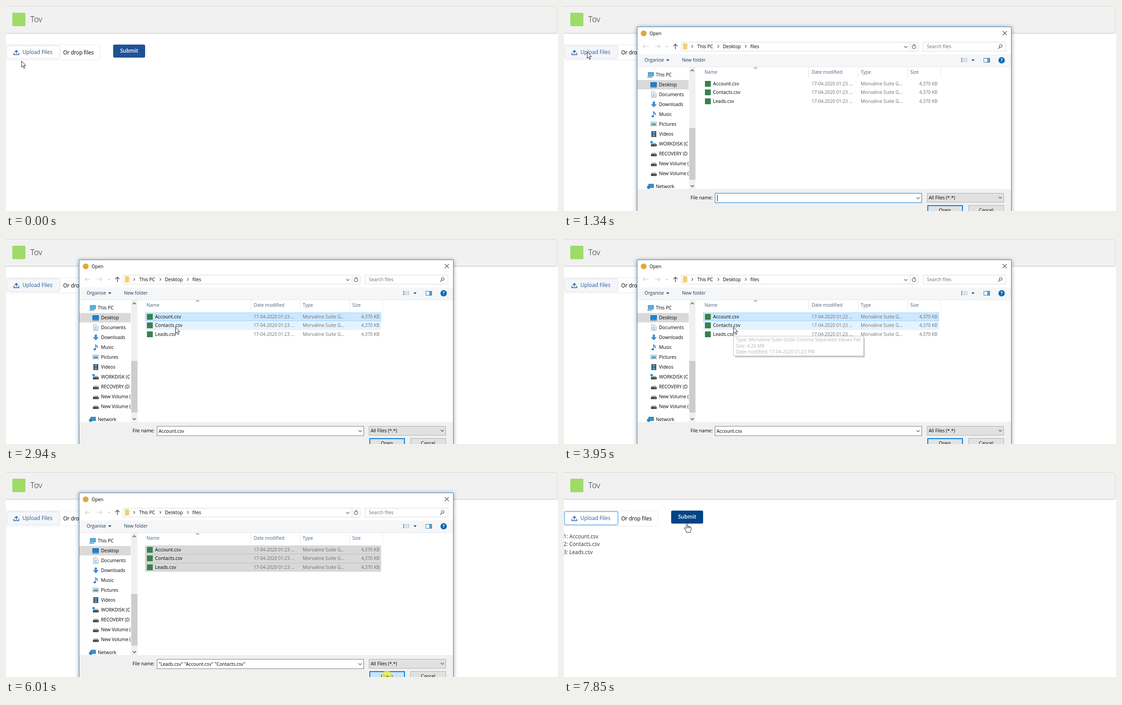
Recreate the animation shown at these times as an HTML page. Size 1226 by 457 pixels, loop 8000 ms.

```html
<!DOCTYPE html>
<html lang="en">
<head>
<meta charset="utf-8">
<title>Upload files</title>
<style>
html, body { margin: 0; width: 100%; height: 100%; overflow: hidden; background: #fff; }
svg { display: block; overflow: hidden; }
text { font-family: "Open Sans", sans-serif; font-size: 10.3px; fill: #000; white-space: pre; }
.page text { font-size: 11.7px; }
.page .title { font-size: 18px; font-weight: 300; fill: #222; }
.page .submit { font-weight: 600; fill: #fff; text-anchor: middle; }
.window { filter: drop-shadow(0 1px 5px rgba(0, 0, 0, .4)); }
.head text { fill: #4c607a; }
.cmd { fill: #1e395b; }
.meta { fill: #6d6d6d; }
.num { font-size: 10px; }
.file { font-size: 10.5px; }
.mid { text-anchor: middle; }
.line { fill: none; stroke: #555; stroke-width: 1.2; }
#tip text { fill: #6a6a6a; }
</style>
</head>
<body>
<svg width="1226" height="457" viewBox="0 0 1226 457">
  <defs>
    <clipPath id="navClip"><rect x="163" y="136" width="114" height="272"/></clipPath>
    <g id="drive">
      <path d="M2 3H11L13 7H0Z" fill="#b5b5b5"/>
      <rect y="6" width="13" height="5" rx="1" fill="#4b4b4b"/>
      <rect x="9" y="8" width="2" height="1" fill="#7fdc8c"/>
    </g>
  </defs>

  <g class="page">
    <rect x="-6" y="2" width="1231" height="60" rx="4" fill="#e4e4e4"/>
    <rect x="-6" y=".5" width="1230.5" height="60" rx="4" fill="#f1f1f1" stroke="#d2d2d2"/>
    <rect x="14" y="15" width="29" height="30" rx="2" fill="#9edc67"/>
    <text class="title" x="54" y="36">Tov</text>
    <rect x="-6.500" y="86.500" width="215" height="34" rx="4" fill="none" stroke="#d9d9d9" stroke-dasharray="3 2"/>
    <rect id="glow" x=".5" y="87.500" width="120" height="31" rx="4" fill="none" stroke="#1589ee" stroke-opacity=".3" stroke-width="2"/>
    <rect id="upload" x="1.500" y="88.500" width="118" height="29" rx="3.500"/>
    <path d="M23 106V99M19.500 102.500L23 99L26.500 102.500M17.500 104.500V108.500H28.500V104.500" fill="none" stroke="#1c5297" stroke-width="1.500"/>
    <text id="uploadText" x="36.500" y="107">Upload Files</text>
    <text x="127" y="108" fill="#222">Or drop files</text>
    <rect id="submit" x="238" y="86" width="71" height="29" rx="3"/>
    <text class="submit" x="273.500" y="104">Submit</text>
    <g id="list" style="opacity:.82">
      <text x="-1" y="148">1: Account.csv</text>
      <text x="-1" y="165">2: Contacts.csv</text>
      <text x="-1" y="183">3: Leads.csv</text>
    </g>
  </g>

  <g id="dialog">
    <rect class="window" x="162.500" y="46.500" width="831" height="460" fill="#fff" stroke="#2f86d0"/>
    <circle cx="177" cy="61" r="6.500" fill="#e0a83c"/>
    <text x="190" y="65">Open</text>
    <path class="line" d="M974.500 56L983.500 65M983.500 56L974.500 65" stroke="#222"/>

    <path d="M187 90H176M180 86L176 90L180 94M202 90H213M209 86L213 90L209 94M226 89L228.500 91.500L231 89" class="line" style="stroke:#c9c9c9"/>
    <path class="line" d="M247.500 96V85M243 89.500L247.500 85L252 89.500" style="stroke-width:1.6"/>
    <path d="M260.500 80.500H786.500V100.500H260.500ZM768.500 80.500V100.500M797.500 80.500H981.500V100.500H797.500Z" fill="#fff" stroke="#d9d9d9"/>
    <path d="M264 83H273V85H275V97H264Z" fill="#f5cf6d"/>
    <path d="M273 85H275V97H272Z" fill="#ffe6a2"/>
    <path class="line" d="M283.500 87L286 90L283.500 93M341.500 87L344 90L341.500 93M402.500 87L405 90L402.500 93M755.500 89.500L759 93L762.500 89.500"/>
    <path class="line" d="M780 88A4 4 0 1 1 776.500 87M776 84.500L779.500 87L776.500 89.500"/>
    <text x="296" y="94">This PC</text><text x="353" y="94">Desktop</text><text x="414" y="94">files</text>
    <text class="meta" x="806" y="94">Search files</text>
    <circle class="line" cx="970" cy="89" r="3"/><path class="line" d="M968 91.500L964 95.500"/>

    <path d="M163 108H993V135H163Z" fill="#f5f6f7"/>
    <path d="M163 135.500H993" stroke="#e6e8ea"/>
    <text class="cmd" x="179" y="124">Organise</text><text class="cmd" x="262" y="124">New folder</text>
    <path d="M227 119H234L230.500 123ZM905 119H912L908.500 123Z" fill="#334a68"/>
    <path d="M882 117H885M882 120.500H885M882 124H885" stroke="#667b91" stroke-width="2"/>
    <path d="M887 117H891M892 117H896M887 120.500H891M892 120.500H896M887 124H891M892 124H896" stroke="#8c9aa8"/>
    <rect x="932.500" y="116.500" width="13" height="9" fill="#fff" stroke="#397299"/>
    <path d="M940 117H945V125H940Z" fill="#4ba5e1"/>
    <circle cx="972" cy="121" r="7" fill="#0864b4"/>
    <text class="mid" x="972" y="125" style="fill:#fff;font-weight:700">?</text>

    <rect x="163" y="165" width="114" height="21" fill="#d9d9d9"/>
    <g clip-path="url(#navClip)">
      <g id="nav"></g>
      <path d="M187 148H199V156H187Z" fill="#4bb5ec" stroke="#397aa5"/><path d="M185 158.500H196" stroke="#6f8798" stroke-width="2"/>
      <rect x="192.500" y="170.500" width="13" height="9" fill="#1684dc" stroke="#0c5ca4"/><path d="M192 181.500H206" stroke="#225d8d"/>
      <path d="M194.500 191.500H201L204.500 195V203.500H194.500Z" fill="#fff" stroke="#8796a3"/><path d="M196.500 196H202M196.500 198.500H202M196.500 201H202" stroke="#4e91c8"/>
      <path d="M197 213H202V219H206L199.500 226L193 219H197Z" fill="#3d8fd8"/>
      <path d="M199 235C200 239 204 238 203 243" fill="none" stroke="#1683da" stroke-width="1.800"/><path d="M199 235V246" stroke="#1683da" stroke-width="1.500"/><ellipse cx="197" cy="246" rx="2.800" ry="2" fill="#1683da"/>
      <rect x="192.500" y="258.500" width="13" height="9" fill="#fff" stroke="#9eabb5"/><path d="M194 260H204V263L194 264Z" fill="#77bfe9"/><path d="M194 264L204 263V266H194Z" fill="#447f83"/>
      <path d="M194 279H205V292H194Z" fill="#333"/><path d="M196.500 280H202.500V285H196.500ZM196.500 286H202.500V291H196.500Z" fill="#5599c9"/><path d="M195 280V292M204 280V292" stroke="#eee" stroke-dasharray="1 2"/>
      <use href="#drive" x="193" y="302"/><rect x="192" y="301" width="5" height="5" fill="#1c9ae8"/>
      <use href="#drive" x="193" y="324"/><use href="#drive" x="193" y="346"/><use href="#drive" x="193" y="368"/>
      <path d="M188 397H199V405H188Z" fill="#3a91cb" stroke="#2b688f"/><circle cx="188" cy="404" r="3.800" fill="#2b83c3"/>
    </g>
    <path d="M278 136H292V408H278Z" fill="#f0f0f0"/>
    <path d="M278 272H292V387H278Z" fill="#cdcdcd"/>
    <path class="line" d="M281.500 145.500L285 142L288.500 145.500M281.500 399.500L285 403L288.500 399.500" style="stroke-width:1.6"/>

    <path d="M543.500 136V159M653.500 136V159M763.500 136V159M836.500 136V159" stroke="#e3e5e7"/>
    <path class="line" d="M422 139.500L425.500 136.500L429 139.500" style="stroke:#777"/>
    <g class="head"><text x="312" y="151">Name</text><text x="550" y="151">Date modified</text><text x="659" y="151">Type</text><text x="769" y="151">Size</text></g>
    <g id="rows"></g>

    <path d="M163 408H993V457H163Z" fill="#f0f0f0"/>
    <text x="281" y="431">File name:</text>
    <rect id="field" x="335.500" y="417.500" width="459" height="21" fill="#fff"/>
    <path class="line" d="M783 426.500L786.500 430L790 426.500"/>
    <text id="names" x="339" y="432"></text>
    <path id="caret" d="M340.500 421V435" stroke="#000"/>
    <rect id="combo" x="806.500" y="417.500" width="170" height="20"/>
    <text x="810" y="431">All Files (*.*)</text>
    <path class="line" d="M965.500 425.500L969 429L972.500 425.500"/>
    <rect id="open" x="808" y="445" width="77" height="22" stroke="#0078d7" stroke-width="2"/>
    <text class="mid" x="846" y="459">Open</text>
    <rect x="898.500" y="444.500" width="78" height="22" fill="#e1e1e1" stroke="#adadad"/>
    <text class="mid" x="937.500" y="459">Cancel</text>
  </g>

  <g id="tip">
    <path d="M4 4H292V48H4Z" fill="#000" opacity=".4"/>
    <rect x=".5" y=".5" width="289" height="44" fill="#fff" stroke="#858585"/>
    <text x="6" y="12">Type: Morvaline Suite Grido Comma Separated Values File</text>
    <text x="6" y="26">Size: 4.26 MB</text>
    <text x="6" y="39">Date modified: 17-04-2020 01:23 PM</text>
  </g>

  <g id="pointer">
    <circle id="click" r="11" fill="#f0ec3c" opacity=".75"/>
    <path id="arrow" d="M.5 .5V14.500L3.500 11.500L5.800 17L8 16L5.700 10.600H10Z" fill="#fff" stroke="#1b1838"/>
    <g id="hand" stroke="#1b1838" stroke-linejoin="round">
      <path d="M-1.500 1.500C-1.500 -.5 1.500 -.5 1.500 1.500V7L4 7.300L6.500 8L8.500 8.800C9.800 9.500 10 10.500 9.800 12C9.600 14.500 8.800 16 8 17.500V20.500H-1.500V18.500L-5.500 12.500C-6.800 10.500 -5 9.300 -3.600 10.400L-1.500 12.300Z" fill="#fff"/>
      <path d="M1.500 7V11M4 7.500V11M6.500 8.200V11.500" fill="none"/>
    </g>
  </g>
</svg>
<script>
const LOOP = 8000;
const $ = id => document.getElementById(id);
const set = (id, attrs) => { for (const k in attrs) $(id).setAttribute(k, attrs[k]); };
const show = (id, on) => { $(id).style.display = on ? '' : 'none'; };
const within = (t, a, b) => t >= a && t < b;
const inBox = (p, x, y, w, h) => p.x >= x && p.x < x + w && p.y >= y && p.y < y + h;

const files = ['Account.csv', 'Contacts.csv', 'Leads.csv'];
const rowTop = i => 164 + Math.round(i * 19.3);
const rowHeight = i => rowTop(i + 1) - rowTop(i);
const selectAt = [2705, 4340, 4890];
const places = ['Desktop', 'Documents', 'Downloads', 'Music', 'Pictures', 'Videos',
  'WORKDISK (C', 'RECOVERY (D', 'New Volume (', 'New Volume ('];

$('nav').innerHTML = '<text x="204" y="157">This PC</text><text x="204" y="406">Network</text>' +
  places.map((name, i) => `<text x="211" y="${179 + i * 22}">${name}</text>`).join('');

$('rows').innerHTML = files.map((name, i) => {
  const y = rowTop(i), base = y + 13;
  return `<rect id="row${i}" x="309.5" y="${y + .5}" width="523" height="${rowHeight(i) - 1}"/>
    <rect x="313" y="${y + 3}" width="13" height="13" fill="#36834c"/>
    <text class="file" x="331" y="${base}">${name}</text>
    <text class="meta num" x="550" y="${base}">17-04-2020 01:23 ...</text>
    <text class="meta" x="659" y="${base}">Morvaline Suite G...</text>
    <text class="meta num" x="789" y="${base}">4,370 KB</text>`;
}).join('');

// Pointer moves: start, end, number of steps, target x, y
const moves = [
  [80, 550, 7, 51, 102], [1560, 1870, 5, 402, 205], [1945, 2020, 2, 410, 229],
  [2100, 2330, 4, 377, 172], [2780, 2940, 3, 376, 196], [4340, 4410, 2, 375, 207],
  [4580, 4650, 2, 375, 213], [4970, 5590, 9, 846, 454], [6160, 6770, 9, 41, 165],
  [6840, 7620, 11, 248, 127], [7700, 7850, 3, 273, 114]
];
const clicks = [[780, 930], [2630, 2780], [4270, 4410], [4820, 4890], [6010, 6160]];

// Share of a stepped change done at t; the first step falls on a, the last on b
function stepped(t, a, b, n) {
  if (t < a) return 0;
  return Math.min(n, Math.floor((t - a) / (b - a) * (n - 1) + 1e-6) + 1) / n;
}
const ease = p => p * p * (3 - 2 * p);

function pointerAt(t) {
  let x = 34, y = 122;
  for (const [a, b, n, tx, ty] of moves) {
    const p = ease(stepped(t, a, b, n));
    x += (tx - x) * p;
    y += (ty - y) * p;
  }
  return { x: Math.round(x), y: Math.round(y) };
}

function drawPage(t, p, closed) {
  const hover = (inBox(p, 1, 88, 119, 30) || within(t, 550, 6320)) && !closed;
  const focus = within(t, 780, 930) || closed;
  set('upload', {
    fill: within(t, 780, 930) ? '#eef1f6' : hover ? '#f4f6f9' : '#fff',
    stroke: focus ? '#65a9e3' : '#d8dde6'
  });
  set('uploadText', { style: `fill:${hover || closed ? '#2a5a9e' : '#30507f'}` });
  show('glow', focus);
  show('list', t >= 6400);
  const onSubmit = inBox(p, 238, 86, 71, 29);
  set('submit', { fill: onSubmit ? '#014486' : '#1f5294' });
  show('hand', onSubmit);
  show('arrow', !onSubmit);
}

function rowFill(i, t, p) {
  if (t >= selectAt[i]) return t >= 6010 ? '#d9d9d9' : '#cce8ff';
  if (!inBox(p, 309, rowTop(i), 524, rowHeight(i))) return 'none';
  return within(t, 4820, 4890) ? '#d9e8f6' : '#e5f3ff';
}

function drawDialog(t, p) {
  const alpha = stepped(t, 1100, 1340, 4) * (1 - stepped(t, 6240, 6470, 4));
  const scale = .95 + .05 * alpha;
  show('dialog', alpha > 0);
  set('dialog', {
    opacity: alpha,
    transform: `translate(578 260) scale(${scale}) translate(-578 -260)`
  });

  const grey = t >= 6010;
  const focus = selectAt.filter(s => t >= s).length - 1;
  files.forEach((_, i) => {
    const fill = rowFill(i, t, p);
    const edge = grey ? '#cacaca' : i === focus ? '#99d1ff' : '#bfe0fb';
    set('row' + i, { fill, stroke: t >= selectAt[i] ? edge : fill });
  });

  $('names').textContent = [
    '', 'Account.csv', '"Account.csv" "Contacts.csv"', '"Leads.csv" "Account.csv" "Contacts.csv"'
  ][focus + 1];
  set('field', { stroke: focus < 0 ? '#0078d7' : '#7a7a7a' });
  show('caret', t < 1870);

  const onCombo = inBox(p, 806, 417, 171, 21);
  set('combo', { fill: onCombo ? '#e5f1fb' : '#e1e1e1', stroke: onCombo ? '#0078d7' : '#adadad' });
  set('open', { fill: grey ? '#cce4f7' : inBox(p, 807, 444, 79, 24) ? '#e5f1fb' : '#e1e1e1' });
}

function drawTip(t) {
  const first = within(t, 1945, 2100), second = within(t, 3800, 4340);
  show('tip', first || second);
  set('tip', {
    transform: first ? 'translate(400 220)' : 'translate(376 216)',
    opacity: first ? 1 : stepped(t, 3800, 4030, 4)
  });
}

function draw(t) {
  const p = pointerAt(t);
  drawPage(t, p, t >= 6320);
  drawDialog(t, p);
  drawTip(t);
  show('click', clicks.some(([a, b]) => within(t, a, b)));
  set('pointer', { transform: `translate(${p.x} ${p.y})` });
}

let start;
function tick(now) {
  start ??= now;
  draw((now - start) % LOOP);
  requestAnimationFrame(tick);
}
draw(0);
requestAnimationFrame(tick);
</script>
</body>
</html>
```
